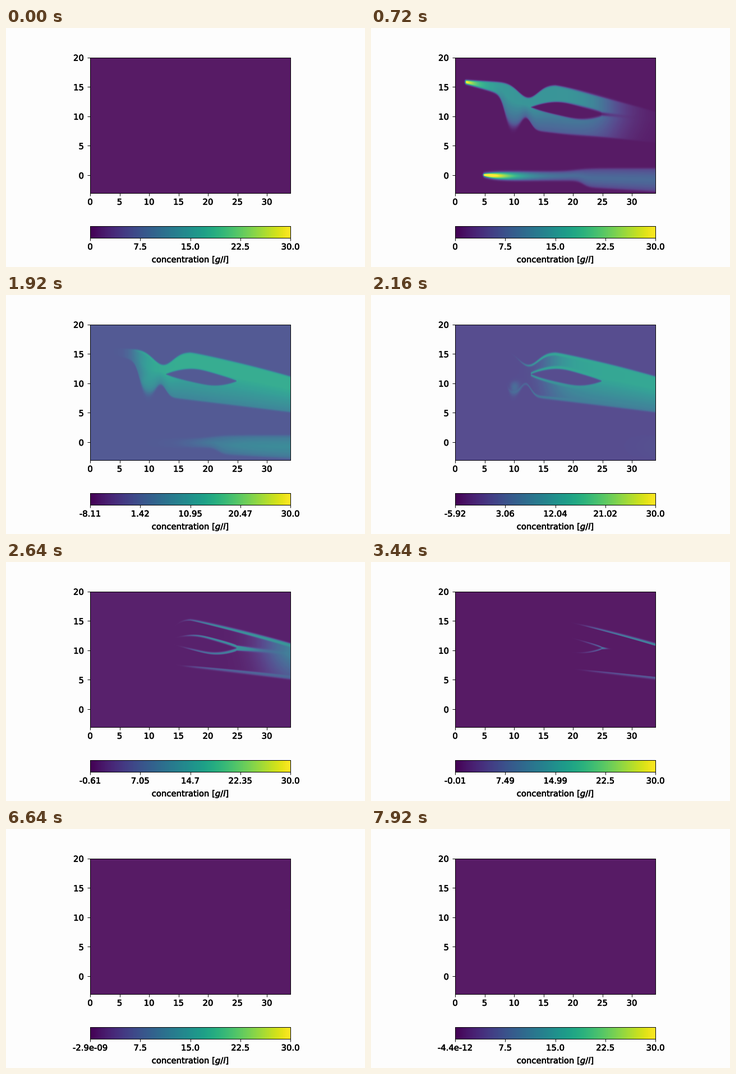
These frames come from a looping animation (640x427 px, 8000 ms). A matplotlib script:

```python
import numpy as np
import matplotlib.pyplot as plt
from matplotlib.animation import FuncAnimation
from matplotlib.patheffects import withStroke

W, H, DPI = 640, 427, 128
FRAMES, INTERVAL = 100, 80
START, STOP = 0, 22          # frames at which the sources open and close
C_MAX = 30.0
UNIT = 1 / 1.2               # size of one nominal point on this canvas

plt.rcParams.update({
    "font.family": "DejaVu Sans",
    "font.size": 10 * UNIT,
    "axes.linewidth": 0.55,
    "axes.labelpad": 4 * UNIT,
    "xtick.major.width": 0.55,
    "ytick.major.width": 0.55,
    "xtick.major.size": 3.5 * UNIT,
    "ytick.major.size": 3.5 * UNIT,
    "xtick.major.pad": 2.7 * UNIT,
    "ytick.major.pad": 4 * UNIT,
})

NX, NY = 357, 242
xs = (np.arange(NX) + 0.5) * 34 / NX
ys = -3 + (np.arange(NY) + 0.5) * 23 / NY
X, Y = np.meshgrid(xs, ys)


def step(v):
    """Smooth switch from 0 to 1."""
    return 0.5 + 0.5 * np.tanh(v / 2)


def bump(v):
    return np.exp(-v ** 2)


# Upper plume: a band that narrows before the island, then drifts down
run = np.maximum(X - 17, 0)
top = (16.25 - 0.055 * X - 0.145 * run - 0.0025 * run ** 2
       - 2.4 * bump((X - 12.4) / 2.4))
fall = step((X - 8.4) / 0.4)
bottom = ((16.1 - 0.29 * X) * (1 - fall) + (9.3 - 0.122 * X) * fall
          + 2 * bump((X - 12) / 1.2))

# Island: a tilted lens with a wake behind it
ISLE_START, ISLE_END = 12.9, 24.9
u = np.clip((X - ISLE_START) / (ISLE_END - ISLE_START), 0, 1)
behind = np.maximum(X - ISLE_END, 0)
isle_mid = 11.6 - 1.2 * step((u - 0.55) / 0.12) - 0.1 * behind
isle_half = 1.2 * np.maximum(np.sin(np.pi * u), 0) ** 0.8
on_isle = (X > ISLE_START) & (X < ISLE_END)

d_top, d_bottom = top - Y, Y - bottom
d_isle = np.abs(Y - isle_mid) - isle_half

# Developed concentration of the upper plume
soft = 0.08 + 0.25 * bump((X - 9.6) / 1.5)
mask = step(d_top / 0.07) * step(d_bottom / soft) * step((X - 1.75) / 0.06)
mask *= np.where(on_isle, step(d_isle / 0.06), 1)
share = np.clip(d_bottom / (top - bottom) / 0.65, 0, 1)
lower_loss = 0.5 * step((X - 8) / 0.4) * (1 - share)
upper = (14.2 + 20 * np.exp(-(X - 1.8) / 1.8)) * (1 - lower_loss) * mask

# Travel times: slow along walls, in the wake and in the side pocket
path = np.maximum(X - 2, 0)
travel = path * (0.32 + 0.002 * path)
travel += 2.5 * bump((X - 10) / 1.3) * step((10.5 - Y) / 0.4)
wake = np.where(X > ISLE_START, np.exp(-behind / 1.5), 0)
wall = np.maximum(bump(np.maximum(d_top, 0) / 0.3),
                  bump(np.maximum(d_bottom, 0) / 0.3))
wall = np.maximum(wall, wake * bump(np.maximum(d_isle, 0) / 0.3))
drag = np.maximum(1.2 + 0.12 * (X - 17), 0)
fill_time = travel * (1 + 0.35 * wall)
clear_time = travel * (1 + drag * wall)

# Lower plume: a jet that widens in two stages
path = np.maximum(X - 4.8, 0)
grow = 1 - np.exp(-path / 2)
low_top = 0.35 + 0.35 * grow + 0.5 * step((X - 20.5) / 1.2)
low_bottom = (-0.15 - 0.75 * grow - 1.1 * step((X - 21.7) / 0.5)
              - 0.06 * np.maximum(X - 22, 0))
low_half = (low_top - low_bottom) / 2
across = np.abs(Y - (low_top + low_bottom) / 2) / low_half
lower = 8.5 + 29 * np.exp(-(path / 5.5) ** 1.5)
lower *= 1 - 0.5 * np.minimum(across, 1) ** 1.5
lower *= step((1 - across) * low_half / 0.1) * step((X - 4.8) / 0.06)
lower_time = path / 7.5


def passed(age, time):
    return step((age - time) / (0.2 + 0.07 * time))


def field(i):
    if i <= START:
        return np.zeros_like(X)
    age = i - START
    up = upper * passed(age, fill_time)
    low = lower * passed(age, lower_time)
    if i > STOP:
        age = i - STOP
        up *= 1 - passed(age, clear_time)
        up *= np.exp(-np.maximum(age - travel, 0) / 80)
        low *= 1 - passed(age, lower_time)
    return up + low


# Undershoot after the sources close; decays exponentially between keys
DIP = {23: 9, 27: 5.92, 33: 0.606, 57: 4e-5, 83: 2.9e-9, 99: 4.4e-12}


def lowest(i):
    if i <= STOP:
        return 0.0
    return -10 ** np.interp(i, list(DIP), np.log10(list(DIP.values())))


def tick_text(v):
    if v == 0:
        return "0"
    if abs(v) < 0.01:
        return f"{v:.1e}"
    return str(round(float(v), 2))


fig = plt.figure(figsize=(W / DPI, H / DPI), dpi=DPI, facecolor="#fdfdfd")


def add_axes(left, upper_edge, right, lower_edge):
    return fig.add_axes([left / W, 1 - lower_edge / H,
                         (right - left) / W, (lower_edge - upper_edge) / H])


def thicken(*labels):
    for label in labels:
        label.set_path_effects([withStroke(linewidth=0.35,
                                           foreground="black")])


ax = add_axes(150, 52.6, 507, 294.6)
image = ax.imshow(field(0), origin="lower", extent=(0, 34, -3, 20),
                  aspect="auto", cmap="viridis", vmin=0, vmax=C_MAX,
                  alpha=0.9, interpolation="nearest")
ax.set_xticks(range(0, 31, 5))
ax.set_yticks(range(0, 21, 5))

bar = add_axes(150, 353.6, 507, 374.6)
bar.imshow(np.linspace(0, 1, 256)[None], extent=(0, 1, 0, 1), aspect="auto",
           cmap="viridis")
bar.set_yticks([])
bar.set_xticks(np.linspace(0, 1, 5))
bar.set_xlabel("concentration [$g/l$]")
thicken(bar.xaxis.label, *ax.get_xticklabels(), *ax.get_yticklabels(),
        *bar.get_xticklabels())


def update(i):
    low = lowest(i)
    image.set_data(field(i))
    image.set_clim(low, C_MAX)
    bar.set_xticklabels([tick_text(v) for v in np.linspace(low, C_MAX, 5)])
    return [image]


anim = FuncAnimation(fig, update, frames=FRAMES, interval=INTERVAL,
                     repeat=True, repeat_delay=0, blit=False)
plt.show()
```
